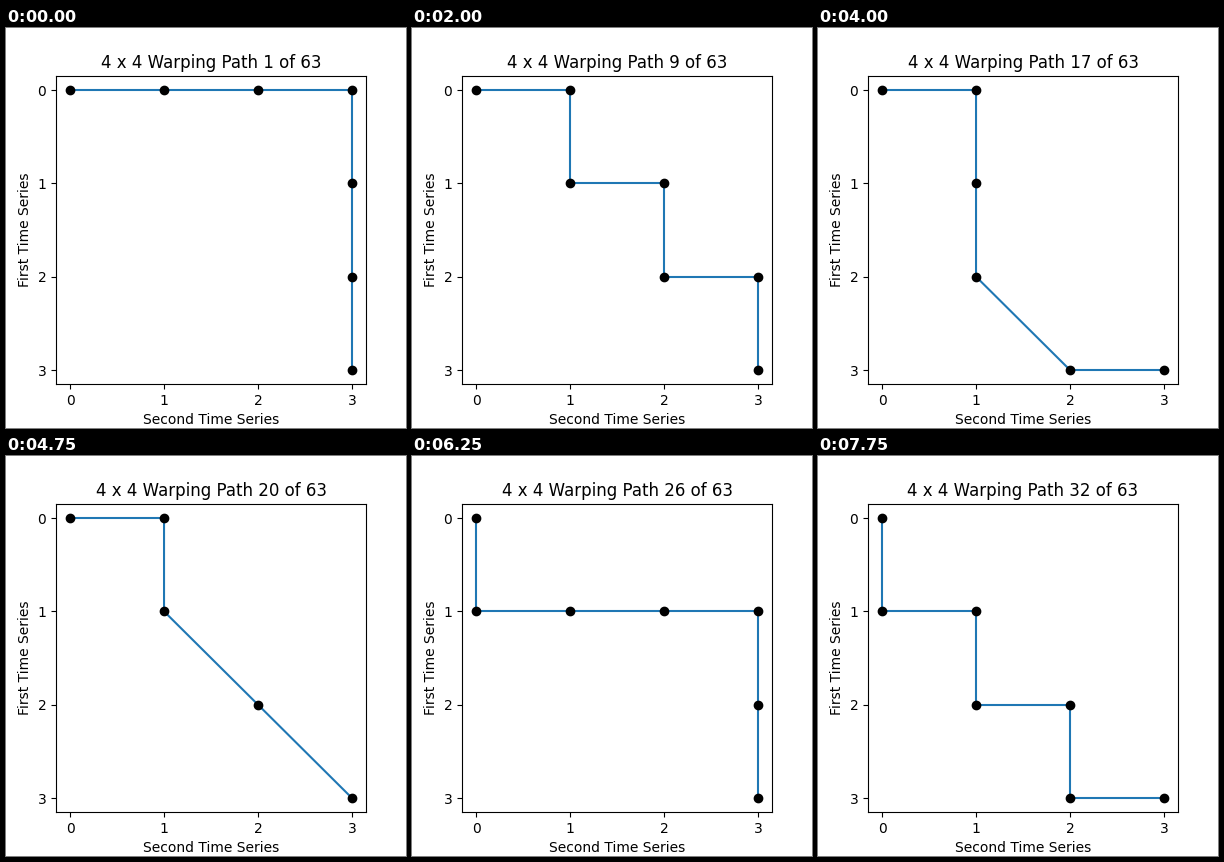
Recreate the animation shown at these times as a matplotlib script. Size 400 px wide and 400 px high, loop 8 s.

```python
import matplotlib.pyplot as plt
from matplotlib.animation import FuncAnimation

SIZE = 4
LAST = SIZE - 1
FRAMES = 32
STEP_MS = 250
MOVES = [(0, 1), (1, 0), (1, 1)]  # right, down, diagonal


def warping_paths(row=0, col=0):
    """Yield every path from (row, col) to the far corner, right moves first."""
    if row == col == LAST:
        yield [(row, col)]
        return
    for d_row, d_col in MOVES:
        if row + d_row <= LAST and col + d_col <= LAST:
            for rest in warping_paths(row + d_row, col + d_col):
                yield [(row, col)] + rest


paths = list(warping_paths())

plt.rcParams["font.family"] = "DejaVu Sans"
fig, ax = plt.subplots(figsize=(4, 4), dpi=100)
margin = 0.05 * LAST
ax.set_xlim(-margin, LAST + margin)
ax.set_ylim(LAST + margin, -margin)
ax.set_xticks(range(SIZE))
ax.set_yticks(range(SIZE))
ax.set_xlabel("Second Time Series")
ax.set_ylabel("First Time Series")

line, = ax.plot([], [], color="#1f77b4")
dots, = ax.plot([], [], "ko")
title = ax.set_title("")


def draw(i):
    rows, cols = zip(*paths[i])
    line.set_data(cols, rows)
    dots.set_data(cols, rows)
    title.set_text(f"{SIZE} x {SIZE} Warping Path {i + 1} of {len(paths)}")
    return line, dots, title


anim = FuncAnimation(fig, draw, frames=FRAMES, interval=STEP_MS,
                     repeat=True, repeat_delay=0, blit=False)
plt.show()
```
